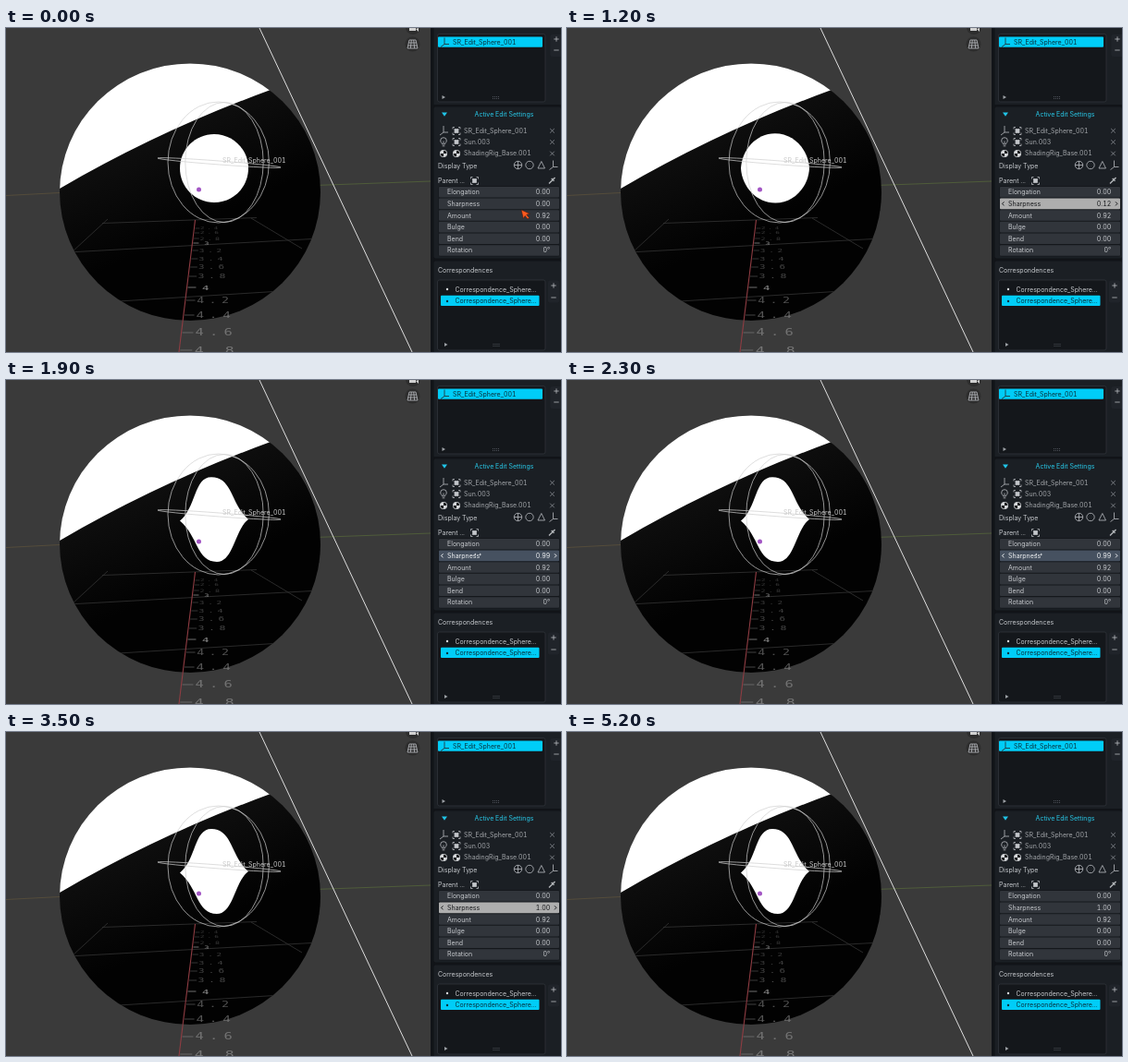
These frames come from a looping animation (600 px wide and 351 px high, 5300 ms). An HTML page:

```html
<!DOCTYPE html>
<html lang="en">
<head>
<meta charset="utf-8">
<title>Sharpness slider</title>
<style>
html, body { margin: 0; width: 100%; height: 100%; overflow: hidden; background: #3a3a3a; }
svg { display: block; width: 600px; height: 351px; }
text { font-family: Inter, "Noto Sans", sans-serif; font-size: 7px; font-variant-numeric: tabular-nums; fill: #c6c9cd; }
.end { text-anchor: end; }
.mid { text-anchor: middle; }
.icon { fill: none; stroke: #b9bcc0; stroke-width: .8; }
.thin { fill: none; stroke: #d0d0d0; stroke-width: .7; }
.grid { fill: none; stroke: #343434; stroke-width: .8; }
.box { fill: #14171b; stroke: #30343a; stroke-width: .8; }
.soft { fill: #a2a5a9; }
.dark { fill: #07313c; }
.ruler text { font-family: "DejaVu Sans Mono", monospace; letter-spacing: .4em; }
</style>
</head>
<body>
<svg viewBox="0 0 600 351" xmlns="http://www.w3.org/2000/svg">
  <defs>
    <clipPath id="ball"><ellipse cx="199" cy="177.7" rx="141" ry="139.3"/></clipPath>
    <linearGradient id="shade" gradientUnits="userSpaceOnUse" x1="170" y1="115" x2="215" y2="210">
      <stop offset="0" stop-color="#0e0e0e"/><stop offset="1" stop-color="#020202"/>
    </linearGradient>
    <g id="axes" class="icon"><path d="M0-5V2H5M0 2L-4 5"/></g>
    <g id="object" class="icon">
      <path d="M-4-2V-4H-2M2-4H4V-2M4 2V4H2M-2 4H-4V2"/>
      <rect x="-2" y="-2" width="4" height="4" fill="#c4c7cb"/>
    </g>
    <g id="material">
      <circle r="4" fill="#d4d6d8"/>
      <path d="M0-3.3A3.3 3.3 0 0 1 3.3 0H0ZM0 3.3A3.3 3.3 0 0 1-3.3 0H0Z" fill="#181b20"/>
    </g>
    <g id="bulb" class="icon"><path d="M-1.5 2.4C-1.5 1-3.3.5-3.3-1.5A3.3 3.3 0 0 1 3.3-1.5C3.3.5 1.5 1 1.5 2.4ZM-1.3 4.3H1.3M0 2V-1"/></g>
    <path id="cross" class="icon" d="M-2.3-2.3L2.3 2.3M2.3-2.3L-2.3 2.3" style="stroke:#8d9197"/>
    <path id="plus" class="icon" d="M-2.7 0H2.7M0-2.7V2.7"/>
    <path id="minus" class="icon" d="M-2.7 0H2.7"/>
    <path id="play" d="M-1.5-2L2 0L-1.5 2Z" fill="#9da1a6"/>
    <path id="grip" d="M-3.5-1H3.5M-3.5 1H3.5" stroke="#555a61" stroke-width=".9" stroke-dasharray="1 1"/>
  </defs>

  <rect width="600" height="351" fill="#3a3a3a"/>
  <path d="M0 181.5L58 178.5" stroke="#574f3c" stroke-width=".9"/>
  <path d="M339 170.3L459 166" stroke="#52603a" stroke-width=".9"/>

  <g clip-path="url(#ball)">
    <rect x="50" y="30" width="300" height="300" fill="url(#shade)"/>
    <path d="M50 30V178L58 174Q166 111 286 67L350 48V30Z" fill="#fff"/>
    <path class="grid" d="M104 211.5L271 205.5M58 243.5L340 228M110 207L72 242M265 206L320 239M90 298L330 283"/>
  </g>
  <path d="M204.5 208L187 351" stroke="#8f3d43" stroke-width="1.1"/>
  <g id="ruler" class="ruler"></g>

  <path id="spot" fill="#fff"/>
  <text x="234" y="146" style="fill:#c9c9c9">SR_Edit_Sphere_001</text>
  <g class="thin">
    <ellipse cx="229.700" cy="145.500" rx="54.700" ry="65.500"/>
    <ellipse cx="236" cy="145.500" rx="42.200" ry="65"/>
    <ellipse cx="230.500" cy="146" rx="66.700" ry="2" transform="rotate(4.3 230.5 146)"/>
  </g>
  <circle cx="208.500" cy="175" r="2.500" fill="#a255c4"/>
  <path d="M274 0L439 351" stroke="#dedede" stroke-width="1"/>

  <g fill="#2d2d2d"><circle cx="440" cy="-1" r="8"/><circle cx="439.500" cy="17.500" r="8"/></g>
  <path d="M436 0H443V3H436ZM443 1L446 0V4Z" fill="#d0d0d0"/>
  <path class="icon" d="M436 13H443L445 22H434ZM435.3 16H443.7M434.7 19H444.3M438.3 13L437.3 22M440.7 13L441.7 22"/>

  <g id="panel">
    <rect x="459" width="141" height="351" fill="#111418"/>
    <rect x="462.500" width="137.500" height="83" fill="#1b1f24"/>
    <rect x="462.500" y="85.500" width="137.500" height="164" rx="2" fill="#1b1f24"/>
    <rect x="462.500" y="252.500" width="137.500" height="99" rx="2" fill="#1b1f24"/>

    <rect class="box" x="466.500" y="6.500" width="116.500" height="73.500" rx="2"/>
    <rect x="467" y="9.500" width="113" height="11.300" rx="1" fill="#00cdf8"/>
    <use href="#axes" x="474" y="15.500" style="filter:brightness(.2)"/>
    <text class="dark" x="483" y="17.800">SR_Edit_Sphere_001</text>
    <use href="#play" x="473" y="75"/><use href="#grip" x="529.500" y="75.500"/>
    <rect x="588.500" y="7" width="14" height="24" rx="2" fill="#20242a"/>
    <use href="#plus" x="595" y="12"/><use href="#minus" x="595" y="24"/>

    <path d="M471 91.500H477L474 95.800Z" fill="#20c5e8"/>
    <text class="mid" x="538.500" y="96" style="fill:#28c8e8">Active Edit Settings</text>
    <use href="#axes" x="473" y="111"/><use href="#object" x="487" y="111.500"/>
    <use href="#bulb" x="473" y="123.500"/><use href="#object" x="487" y="123.500"/>
    <use href="#material" x="473" y="136"/><use href="#material" x="487" y="136"/>
    <text class="soft" x="495" y="113.800">SR_Edit_Sphere_001</text>
    <text class="soft" x="495" y="126">Sun.003</text>
    <text class="soft" x="495" y="138.400">ShadingRig_Base.001</text>
    <use href="#cross" x="590.500" y="111.300"/><use href="#cross" x="590.500" y="123.600"/><use href="#cross" x="590.500" y="136"/>
    <text x="467" y="151.500">Display Type</text>
    <g class="icon">
      <circle cx="553.500" cy="148.500" r="4.200"/><path d="M549.300 148.500H557.700M553.500 144.300V152.700"/>
      <circle cx="566" cy="148.500" r="4.200"/>
      <path d="M578.800 144.500L582.500 152H575Z"/>
    </g>
    <use href="#axes" x="591.500" y="148.500"/>
    <text x="467" y="167.800">Parent ...</text>
    <use href="#object" x="506.500" y="165.500"/>
    <path d="M587 168.500L591 164.500M589.700 163L592.500 165.800M591.500 164L593.500 162" stroke="#b4b7bb" stroke-width="1.400"/>

    <rect x="467.500" y="171" width="131" height="76.500" rx="2" fill="#15181c"/>
    <g id="rows"></g>

    <text x="467" y="265.300">Correspondences</text>
    <rect class="box" x="466.500" y="273" width="116.500" height="76" rx="2"/>
    <rect x="470" y="289.800" width="106.500" height="11.200" rx="1" fill="#00cdf8"/>
    <circle cx="477" cy="283" r="1.200" fill="#dcdee0"/><circle class="dark" cx="477" cy="296" r="1.200"/>
    <text x="485.500" y="285.500">Correspondence_Sphere...</text>
    <text class="dark" x="485.500" y="298.300">Correspondence_Sphere...</text>
    <use href="#play" x="475.500" y="343"/><use href="#grip" x="530" y="343.500"/>
    <rect x="586" y="273.500" width="12" height="24" rx="2" fill="#20242a"/>
    <use href="#plus" x="592" y="279"/><use href="#minus" x="592" y="292"/>
  </g>

  <path id="arrow" d="M0 0L9.500 4.300L5.800 5.200L8.600 8.700L6.900 10L4.200 6.500L2.300 9.400Z" fill="#ff5a1f" stroke="#431a10" stroke-width=".6"/>
  <path id="slide" d="M-4 0L-2-1.600V1.600ZM4 0L2-1.600V1.600Z"/>
</svg>
<script>
const LOOP = 5300, STEP = 100;
const $ = id => document.getElementById(id);

function add(parent, tag, attrs, text) {
  const el = document.createElementNS("http://www.w3.org/2000/svg", tag);
  for (const key in attrs) el.setAttribute(key, attrs[key]);
  if (text) el.textContent = text;
  parent.append(el);
  return el;
}

// Depth labels lying on the floor, growing towards the viewer
const depths = [217, 222, 228, 233, 241, 250, 259, 269, 281, 295, 311, 330, 349];
depths.forEach((y, i) => {
  const n = (2.4 + i * 0.2).toFixed(1), whole = n.endsWith(".0");
  const k = (y - 217) / 133;
  const size = 4 + 7 * k, wide = 1.85 - 0.35 * k;
  const axis = 204.5 - (y - 208) * 0.122;
  const ink = whole ? "#8c8c8c" : `rgb(150 150 150 / ${0.35 + 0.3 * k})`;
  const x = axis + 6.5 + 10 * k + (whole ? 5 : 0);
  add($("ruler"), "text", {
    transform: `translate(${x} ${y + size * 0.34}) scale(${wide} 1)`,
    style: `font-size:${size}px;fill:${ink}`
  }, whole ? n[0] : n);
  add($("ruler"), "path", { d: `M${axis + 1} ${y}h${5 + 8 * k}`, stroke: ink, "stroke-width": .8 });
});

const fields = [["Elongation", "0.00"], ["Sharpness", "0.00"], ["Amount", "0.92"],
  ["Bulge", "0.00"], ["Bend", "0.00"], ["Rotation", "0°"]];
const rows = fields.map(([name, value], i) => {
  const y = 177.7 + i * 12.65, g = $("rows");
  return {
    bar: add(g, "rect", { x: 468, y: y - 5.8, width: 130, height: 11.6, rx: 1 }),
    name: add(g, "text", { x: 477, y: y + 2.5 }, name),
    value: add(g, "text", { x: 588.3, y: y + 2.5, class: "end" }, value),
    tips: add(g, "path", { d: `M472.500 ${y - 2}l-2 2l2 2M593 ${y - 2}l2 2l-2 2`, fill: "none" })
  };
});

const looks = {
  idle: ["#31353b", "#c6c9cd", "none"],
  hover: ["#465160", "#f0f2f4", "#f0f2f4"],
  drag: ["#aeaeae", "#17191c", "#17191c"]
};
function paint(row, mode) {
  const [bar, ink, tips] = looks[mode];
  row.bar.style.fill = bar;
  row.name.style.fill = row.value.style.fill = ink;
  row.tips.style.stroke = tips;
}
rows.forEach(row => paint(row, "idle"));

// Matching cubic outlines: round and fully sharpened
const round = [188, 152, 188, 131.6, 204.6, 115, 225, 115, 245.4, 115, 262, 131.6, 262, 152,
  262, 172.4, 245.4, 189, 225, 189, 204.6, 189, 188, 172.4, 188, 152];
const sharp = [188, 152.5, 206, 138, 203, 105, 222, 105, 245, 105, 243, 135, 262, 151,
  247, 162, 246, 197, 228, 197, 206, 197, 208, 169, 188, 152.5];
const clamp = (v, a = 0, b = 1) => Math.min(b, Math.max(a, v));
const mix = (a, b, k) => a + (b - a) * k;

function outline(k) {
  const p = round.map((v, i) => mix(v, sharp[i], k).toFixed(2));
  return `M${p.slice(0, 2)}C${p.slice(2)}Z`;
}

function sharpness(t) {
  if (t < 1100) return 0;
  if (t < 2500) return clamp(0.12 + (t - 1200) * 0.00145, 0, 0.99);
  return 1;
}

function modeAt(t) {
  if (t >= 1000 && t < 1900 || t >= 2500 && t < 4300) return "drag";
  return t >= 400 && t < 4700 ? "hover" : "idle";
}

function place(el, x, y, shown) {
  el.setAttribute("transform", `translate(${x} ${y})`);
  el.style.display = shown ? "" : "none";
}

function draw(t) {
  const v = sharpness(t), mode = modeAt(t);
  // The outline stays nearly round until the value has grown a little
  $("spot").setAttribute("d", outline(v ** 1.3));
  rows[1].value.textContent = v.toFixed(2);
  paint(rows[1], mode);
  const k = clamp(t / 500), ease = k * k * (3 - 2 * k);
  place($("arrow"), mix(557, 515.5, ease), mix(197, 192.5, ease), t < 1000);
  place($("slide"), 510, 189, t >= 1900 && mode === "hover");
  $("slide").style.fill = t < 2500 ? "#c9cdd2" : "#c5482f";
}

function tick() {
  const t = performance.now() % LOOP;
  draw(Math.floor(t / STEP) * STEP);
  requestAnimationFrame(tick);
}
tick();
</script>
</body>
</html>
```
